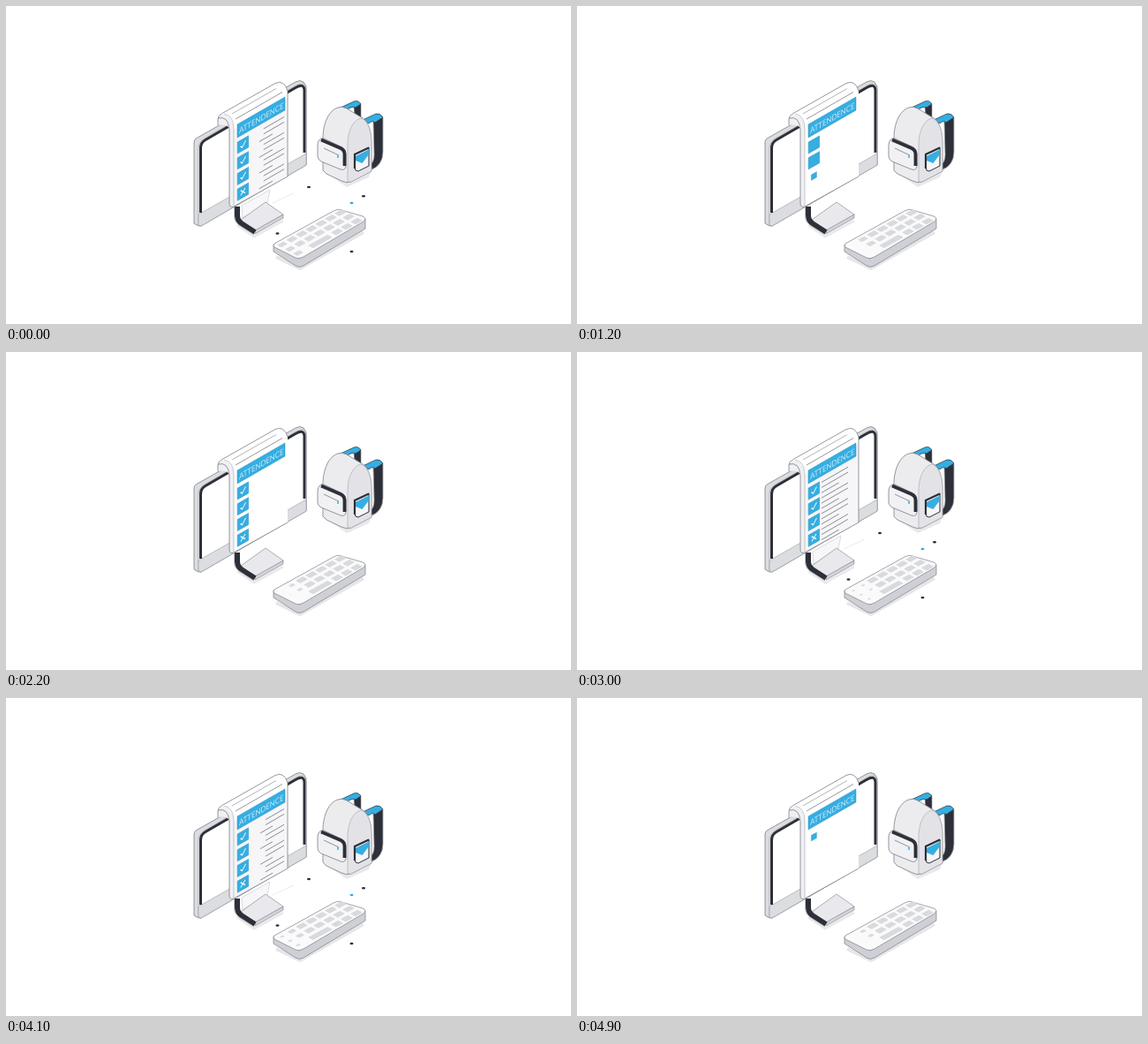
Write an HTML page with a canvas that moves like this. It is 640 px wide and 360 px high and loops after 5000 ms.

```html
<!DOCTYPE html>
<html lang="en">
<head>
<meta charset="utf-8">
<title>Attendance checklist</title>
<style>
html, body { margin: 0; width: 100%; height: 100%; overflow: hidden; background: #fff; }
canvas { display: block; width: 640px; height: 360px; }
</style>
</head>
<body>
<canvas id="stage" width="640" height="360"></canvas>
<script>
const ctx = document.getElementById('stage').getContext('2d');
const LOOP = 5000, STEP = 100, SLOPE = 0.577;
const BLUE = '#35aee2', DARK = '#2d3038', EDGE = '#7b7e86', GREY = '#dcdde1', PALE = '#ececef';

const clamp = v => Math.max(0, Math.min(1, v));
const ramp = (t, start, length) => clamp((t - start) / length);

// Piecewise linear value from [time, value] pairs
function track(t, points) {
  for (let i = 1; i < points.length; i++) {
    const [t0, a] = points[i - 1], [t1, b] = points[i];
    if (t <= t1) return a + (b - a) * ramp(t, t0, t1 - t0);
  }
  return points[points.length - 1][1];
}

function shape(d, fill, stroke, width = 0.8) {
  const path = new Path2D(d);
  if (fill) { ctx.fillStyle = fill; ctx.fill(path); }
  if (stroke) { ctx.strokeStyle = stroke; ctx.lineWidth = width; ctx.stroke(path); }
}

const line = (d, color, width) => shape(d, null, color, width);

function faded(alpha, draw) {
  if (alpha <= 0) return;
  ctx.save();
  ctx.globalAlpha = alpha;
  draw();
  ctx.restore();
}

// Draws on the plane of the sheet, which rises to the right
function onSheet(x, y, draw, scale = 1) {
  ctx.save();
  ctx.transform(0.866 * scale, -0.5 * scale, 0, scale, x, y);
  draw();
  ctx.restore();
}

function drawStand(show) {
  faded(0.5, () => line('M262 248L281 261L314 243', '#d2d3d8', 3));
  faded(show, () => {
    shape('M267 226L299 208L296 223L268 240Z', '#f7f7f9', '#c5c7cc', 0.6);
    line('M302 223L326 212', '#e4e5e8', 0.8);
  });
  shape('M282 253L314 236V240L282 258Z', '#d3d4d9', EDGE, 0.6);
  shape('M294 222L314 236L282 254L266 242Z', '#e9e9ed', EDGE, 0.6);
  line('M262 227V237Q262 243 267 246.5L282 256', DARK, 6);
  line('M258.5 228V239Q259 245 264 248L281 259', '#b4b6bc', 0.8);
}

function drawMonitor() {
  shape('M213 154Q213 151 216 149.5L328 86Q333 83 337 86L340 91V180L221 249Q218 250 213 246Z', GREY, EDGE);
  shape('M218 248V161Q218 154 225 150L329 90Q339 84 340 95V180L221 249Z', '#fff', '#8a8d94', 0.6);
  shape('M218 236L340 167V180L221 249L218 248Z', GREY, '#9a9ca3', 0.6);
  line('M220.5 234V161Q220.5 154.5 226 151.5L328 92.5Q337.5 87 338 95V166', DARK, 3);
}

function drawBox(i, t) {
  const grow = ramp(t, 750 + i * 175, 200);
  const size = t < 700 ? 1 - ramp(t, 550, 150) : grow;
  if (!size) return;
  const mark = t < 700 ? 1 - ramp(t, 550, 100) : ramp(t, 1500 + i * 150, 150);
  onSheet(268.4, 157 + i * 17.75, () => {
    ctx.fillStyle = BLUE;
    ctx.fillRect(-7.2, -6.5, 14.4, 13);
    ctx.strokeStyle = '#268fbe';
    ctx.lineWidth = 0.5;
    ctx.strokeRect(-7.2, -6.5, 14.4, 13);
    if (!mark) return;
    ctx.setLineDash([14 * mark, 30]);
    line(i < 3 ? 'M-3.2 0.2L-1 2.6L3.6 -2.8' : 'M-3 -2.8L3 2.8M3 -2.8L-3 2.8', '#fff', 1.25);
  }, size);
}

function drawRows(t) {
  const cut = t < 700 ? ramp(t, -350, 900) : 0;
  const reach = t < 700 ? 1 : ramp(t, 2250, 950);
  if (cut >= 1 || !reach) return;
  for (let i = 0; i < 12; i++) {
    const length = i % 3 === 2 ? 25 : 38;
    const y = 147.5 + Math.floor(i / 3) * 17.75 + (i % 3) * 5.9;
    const a = length * cut, b = length * reach;
    line(`M${277 + a} ${y - a * SLOPE}L${277 + b} ${y - b * SLOPE}`, '#777a82', 0.85);
  }
}

function drawSheet(t, show) {
  const roll = 'M240 135V128Q240 124 245 121.5L305 87.5Q315 83 319 96';
  shape(roll + 'V193L258 227Q253 229 253 223V140Q252 132 240 135Z', '#fff');
  faded(show, () => shape('M258 140L319 104V193L258 227Z', '#f6f6f9'));
  shape('M240 127Q249 118 255 128Q258 133 258 140V227Q253 229 253 223V140Q251 131 240 135Z', '#f0f0f3');
  line(roll, EDGE, 0.8);
  line('M240 127Q252 124 253 140V223Q253 229 258 227L319 193', EDGE, 0.8);
  line('M247 122Q258 124 258 139V226', '#b1b3b9', 0.7);
  line('M256 122L306 93.5', '#a0a2a9', 0.8);
  line('M260 128L313 97.5', EDGE, 0.8);
  faded(show, () => line('M319 96V193', EDGE, 0.8));

  shape('M262 134L316 103V118L262 149Z', BLUE, '#268fbe', 0.5);
  onSheet(264, 144.6, () => {
    ctx.fillStyle = '#cdeaf7';
    ctx.font = '9px Lato, "Open Sans", sans-serif';
    ctx.fillText('ATTENDENCE', 0, 0);
  });
  for (let i = 0; i < 4; i++) drawBox(i, t);
  drawRows(t);
}

function drawStraps() {
  shape('M394 113L402 111V128L395 125Z', DARK, EDGE, 0.6);
  shape('M379 115L394 108Q399 106 402 111L396 115Q391 113 386 118Z', BLUE, DARK, 0.7);
  shape('M416 131L427 126V165Q427 181 412 186V180Q417 177 417 168Z', DARK, '#a0a2a9', 0.8);
  shape('M404 129L419 122Q424 121 427 126L418 132Q415 129 411 133Z', BLUE, DARK, 0.7);
}

function drawBackpack() {
  faded(0.55, () => shape('M360 187L386 205L411 194L415 184Z', '#d5d6da'));
  drawStraps();
  shape('M359 186V150C359 132 366 118 376 115Q380 113 386 116L404 127C411 132 414 143 414 155V187L391 199Q386 201 380 198L363 190Z', PALE, EDGE);
  shape('M387 199V158C387 140 394 128 403 127C411 131 414 143 414 155V187L391 199Z', '#e3e3e7', '#a2a4ab', 0.6);

  shape('M353 157Q354 149 360 150L381 160Q385 162 385 167V180Q385 187 379 185L357 176Q353 174 353 170Z', '#f1f1f4', EDGE);
  line('M357 151.5L379 161Q383.5 163 383.5 168V181', DARK, 3.8);
  line('M360 161L377 169', '#777a82', 0.8);
  line('M376 169V172', BLUE, 1.5);

  shape('M395 168L411 160V181L399 187Q395 187 395 183Z', '#f6f6f8', DARK, 1);
  shape('M396 170L411 162.5V168L403.5 178L396 175Z', BLUE);
  line('M395 184V168L411 160.5', DARK, 2.2);
}

function drawKeyboard(time) {
  faded(0.6, () => line('M306 284L333 297L405 256', '#d5d6da', 4));
  shape('M303 270V278L328 294Q332 297 337 294L407 252V241L332 286Z', '#cfd0d5', EDGE, 0.7);
  shape('M304 269L371 232Q376 229 380 231L404 238Q409 240 405 244L337 284Q332 287 328 285L304 273Q302 271 304 269Z', '#fafafb', EDGE, 0.7);
  const near = track(time, [[0, 0.85], [500, 0.45], [900, 0], [2200, 0.1], [3000, 0.3], [4100, 0.4], [4900, 0]]);
  const next = track(time, [[0, 0.95], [500, 0.7], [900, 0.6], [1200, 0.85], [2200, 0.55], [3000, 0.35], [4100, 0.75], [4900, 0.55]]);
  for (let col = 0; col < 7; col++) {
    for (let row = 0; row < 3; row++) {
      if (row === 2 && col > 0 && col < 4) continue;
      const s = col === 0 ? near : col === 1 ? next : 1;
      key(313 + col * 11 + row * 9, 270 - col * 6 + row * 4.8, s, 4.2);
    }
  }
  key(356, 266.5, 1, 11);
}

function key(x, y, scale, half) {
  if (!scale) return;
  ctx.save();
  ctx.transform(scale, -0.55 * scale, 0.88 * scale, 0.48 * scale, x, y);
  ctx.fillStyle = '#d9dade';
  ctx.beginPath();
  ctx.roundRect(-half, -3.3, half * 2, 6.6, 1);
  ctx.fill();
  ctx.restore();
}

function drawDots(t) {
  const scale = t < 800 ? 1 - ramp(t, 350, 450) * 0.9 : ramp(t, 2500, 400);
  if (!scale) return;
  for (const [x, y, color] of [[343, 205, DARK], [405, 215.3, DARK], [307.5, 257.5, DARK], [391.5, 278, DARK], [391.5, 223, BLUE]]) {
    ctx.fillStyle = color;
    ctx.beginPath();
    ctx.ellipse(x, y, 2 * scale, 1.2 * scale, 0, 0, Math.PI * 2);
    ctx.fill();
  }
}

function render(now) {
  const time = Math.floor((now % LOOP) / STEP) * STEP;
  // The checklist repeats sooner than the loop; the restart is a cut
  const t = time >= 3700 ? time - 4050 : time;
  const show = t < 1000 ? 1 - ramp(t, 500, 350) : ramp(t, 2200, 500);
  ctx.fillStyle = '#fff';
  ctx.fillRect(0, 0, 640, 360);
  drawStand(show);
  drawMonitor();
  drawSheet(t, show);
  drawBackpack();
  drawKeyboard(time);
  drawDots(t);
}

const start = performance.now();
function frame() {
  render(performance.now() - start);
  requestAnimationFrame(frame);
}
frame();
</script>
</body>
</html>
```
